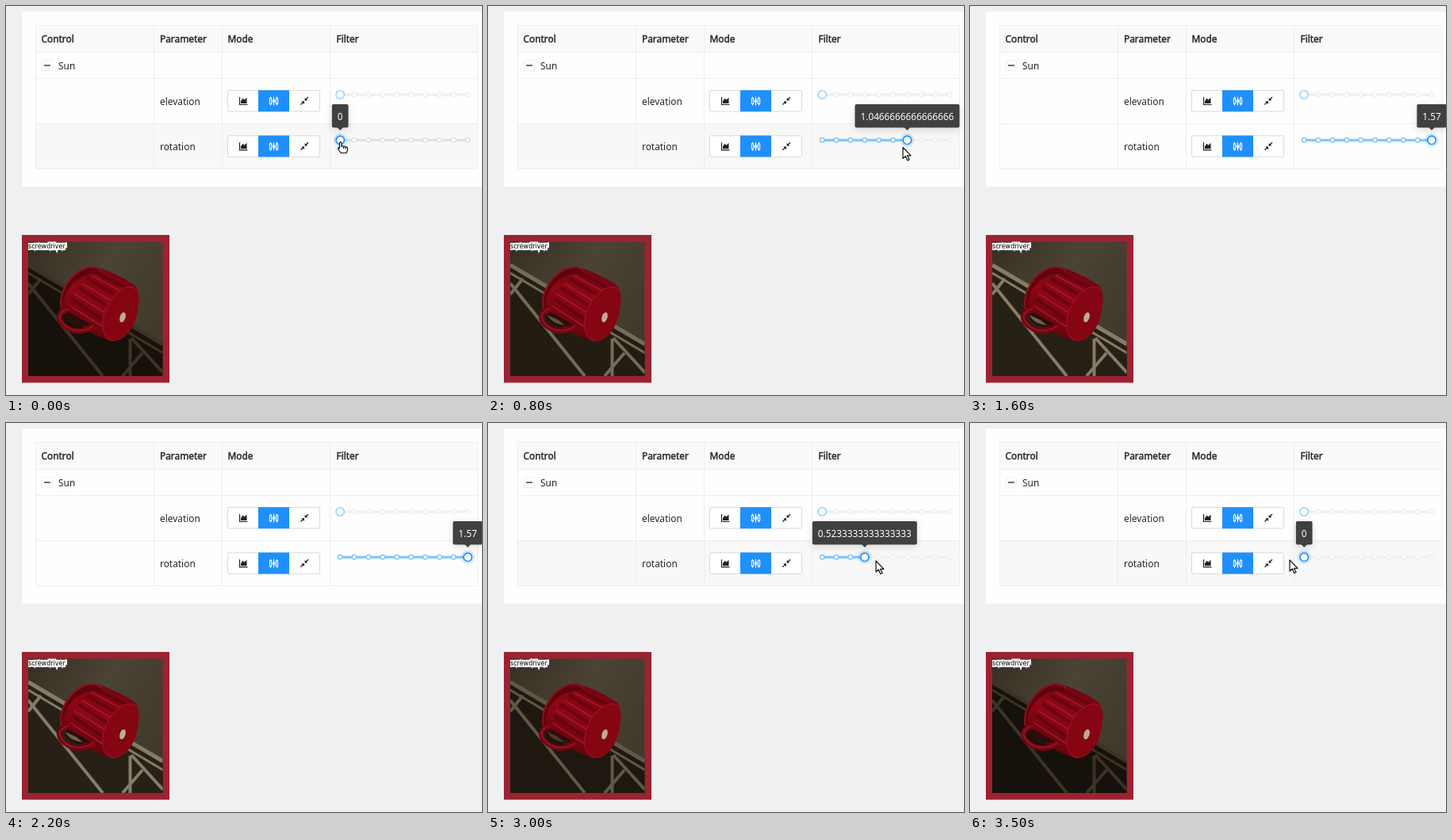
These frames come from a looping animation (600 by 491 pixels, 3600 ms). An HTML page:

```html
<!DOCTYPE html>
<html lang="en">
<head>
<meta charset="utf-8">
<title>Sun control</title>
<style>
  html, body { margin: 0; width: 600px; height: 491px; overflow: hidden; background: #eef0f2; }
  svg { display: block; font: 11.9px "Noto Sans", "Open Sans", sans-serif; fill: none; }
  text { fill: #262626; }
  .head { stroke: #262626; stroke-width: .45; }
  .cell { stroke: #eeeeee; }
  .tip { filter: drop-shadow(0 3px 5px #0002); }
  .label { font: 8px "DejaVu Sans", sans-serif; fill: #000; stroke: #fff; stroke-width: 4.5; stroke-linejoin: miter; paint-order: stroke; }
</style>
</head>
<body>
<svg width="600" height="491" viewBox="0 0 600 491">
  <defs>
    <clipPath id="photo"><path d="M28 297.500h169.500v169.500H28z"/></clipPath>
    <clipPath id="body"><use href="#mugShape"/></clipPath>
    <linearGradient id="floor" x1="0" y1="0" x2="1" y2=".6">
      <stop stop-color="#352e22"/><stop offset=".5" stop-color="#4b4435"/><stop offset="1" stop-color="#40392c"/>
    </linearGradient>
    <linearGradient id="red" x1=".75" y1=".1" x2=".3" y2=".95">
      <stop stop-color="#740510"/><stop offset=".45" stop-color="#8f0716"/><stop offset="1" stop-color="#5c030b"/>
    </linearGradient>
    <g id="buttons">
      <rect x="279.500" y="106.500" width="116" height="26.500" rx="1.500" fill="#fff" stroke="#d9d9d9"/>
      <path d="M318 106.200h39v27h-39z" fill="#1f90fb"/>
      <path d="M294.500 115v9.500h10" stroke="#222" stroke-width="1.200"/>
      <path d="M296 123v-3l2.500-3.500 2 2 3-3v7.500z" fill="#222"/>
      <g stroke="#fff" stroke-width="1.100">
        <path d="M333.500 114.500v2m0 7v2M337.500 114.500v11M341.500 114.500v2m0 7v2"/>
        <rect x="332.400" y="116.500" width="2.200" height="7"/><rect x="340.400" y="116.500" width="2.200" height="7"/>
        <path d="M337.500 117.500l1.500 2.500-1.500 2.500-1.500-2.500z" fill="#fff"/>
      </g>
      <path d="M381 115l-4 4M371.500 124.500l4-4" stroke="#222" stroke-width="1.300"/>
      <path d="M376.700 115.700v3.600h3.600zM372.300 120.300h3.600v3.600z" fill="#222"/>
    </g>
    <g id="truss">
      <path d="M28 327L198 427" stroke-width="5"/>
      <path d="M28 337L198 438" stroke-width="3"/>
      <path d="M28 350L122 467M44 344L28 364M156.500 420V467M172 438L147 467M158 419L198 463" stroke-width="4"/>
    </g>
  </defs>

  <path d="M20 7h580v221H20z" fill="#fefefe"/>
  <path d="M37 24h557v34H37z" fill="#fafafa"/>
  <path id="row" d="M37 149h557v56H37z" fill="#f8f8f8"/>
  <path class="cell" d="M37.500 24.500h557v181h-557zM37 58.500h557M37 91.500h557M37 148.500h557M186.500 24v181M272.500 24v181M408.500 24v181"/>
  <g class="head">
    <text x="44.500" y="46">Control</text><text x="194" y="46">Parameter</text>
    <text x="279.500" y="46">Mode</text><text x="416.500" y="46">Filter</text>
  </g>
  <rect x="45.500" y="68.500" width="13" height="13" rx="1" fill="#fff" stroke="#eee"/>
  <path d="M48 75h8" stroke="#222" stroke-width="1.300"/>
  <text x="66" y="79.500">Sun</text>
  <text x="194" y="125">elevation</text><text x="194" y="182">rotation</text>
  <use href="#buttons"/><use href="#buttons" y="57.300"/>
  <g id="sliders"></g>

  <path d="M20 289h186v186.500H20z" fill="#9b2331"/>
  <g clip-path="url(#photo)">
    <path d="M28 297h170v170H28z" fill="url(#floor)"/>
    <path d="M28 328L198 428V467H28z" fill="#17110b"/>
    <use href="#truss" stroke="#3b3326"/>
    <g id="lit">
      <path d="M28 328L198 428V467H28z" fill="#272016"/>
      <use href="#truss" stroke="#857b67"/>
    </g>
    <path id="mugShape" d="M108 328.500C128 332 150 344 163 353C169 361 168 374 165 389C161 407 149 424 132 423C111 416 86 402 70 385C62 369 79 331 108 328.500z" fill="url(#red)"/>
    <g clip-path="url(#body)">
      <path d="M113 336l49 25M102 344l43 25M91 355l40 26M83 369l40 28" stroke="#5a030c" stroke-opacity=".6" stroke-width="4.500"/>
      <path d="M108 340l46 25M96 350l41 25M86 363l40 25M80 378l42 27" stroke="#ae2030" stroke-opacity=".75" stroke-width="1.500"/>
      <path d="M70 383C62 366 82 331 119 333" stroke="#5c040d" stroke-width="9"/>
      <ellipse cx="146" cy="388.500" rx="36" ry="21" transform="rotate(-65 146 388.500)" fill="#860512" stroke="#9a1322" stroke-width="1.200"/>
    </g>
    <path d="M71 384C63 368 81 331 109 329.500Q116 330 121 335" stroke="#8f101d" stroke-width="2"/>
    <ellipse cx="147" cy="393" rx="3.500" ry="6.500" transform="rotate(18 147 393)" fill="#b8ad9a"/>
    <path d="M78 386C70 392 78 402 92 405L107 402z" fill="#2a0e0b"/>
    <path id="glint" d="M75 390Q80 401 97 403L88 396z" fill="#6f6350"/>
    <path d="M82 382C64 385 64 396 74 404C86 413 99 412 112 404" stroke="#760511" stroke-width="6.500"/>
    <path d="M79 382C63 387 66 396 75 404C86 412 99 411 110 404" stroke="#a01a28" stroke-width="1.300"/>
    <text class="label" x="28" y="306">screwdriver</text>
  </g>

  <g class="tip">
    <rect id="tipBox" y="124" height="29.500" rx="2" fill="#404040"/>
    <path id="tipArrow" d="M-4 153h8l-4 4z" fill="#404040"/>
    <text id="tipText" y="143.800" text-anchor="middle" style="fill:#fff;font-size:11.800px"></text>
  </g>
  <g id="cursor" fill="#fff" stroke="#111" stroke-width="1.200" stroke-linejoin="round">
    <path id="arrow" d="M0 0V14L3.300 11L5.700 16.500L8 15.500L5.600 10.300H10z"/>
    <path id="hand" d="M-.5 1.500Q.7 -.5 2 1.500V6.500Q3.500 5 4.500 6.500Q6 5.500 7 7Q9.500 6.500 9.500 9V11L8 14.500H1L-2.500 9Q-2.500 7 -.5 8.500zM4.500 7v2M7 7.500v2"/>
  </g>
</svg>
<script>
const LOOP = 3600, TICK = 100, STEPS = 9, MAX = 1.57;
// time, pointer x, pointer y, slider step
const PATH = [
  [0, 421, 171, 0], [500, 476, 171, 3], [1100, 570, 186, 8], [1400, 618, 190, 9],
  [2400, 604, 188, 9], [2600, 561, 183, 8], [3000, 489, 174, 3], [3500, 403, 173, 0], [3600, 403, 173, 0]
];
const $ = id => document.getElementById(id);
const set = (id, attrs) => { for (const k in attrs) $(id).setAttribute(k, attrs[k]); };
const clamp = n => Math.max(0, Math.min(1, n));
const stepX = i => 421.2 + i * 17.87;

function slider(y, step, rail, track, handle, focused) {
  const x = stepX(step);
  let out = `<g stroke-width="3.2"><path d="M421 ${y}H582" stroke="${rail}"/><path d="M421 ${y}H${x}" stroke="${track}"/></g>`;
  for (let i = 0; i <= STEPS; i++)
    out += `<circle cx="${stepX(i)}" cy="${y}" r="2.7" fill="#fff" stroke="${i <= step ? track : rail}" stroke-width="1.5"/>`;
  if (focused) out += `<circle cx="${x}" cy="${y}" r="8.8" fill="#1890ff" fill-opacity=".17"/>`;
  return out + `<circle cx="${x}" cy="${y}" r="5.2" fill="#fff" stroke="${handle}" stroke-width="1.6"/>`;
}

function pose(t) {
  const k = PATH.findIndex(p => p[0] > t), a = PATH[k - 1], b = PATH[k];
  const f = (t - a[0]) / (b[0] - a[0]);
  return a.map((n, i) => n + (b[i] - n) * f);
}

function draw(t) {
  const [, px, py, raw] = pose(t);
  const step = Math.round(raw), x = stepX(step), dragging = t <= 600;
  const value = step === STEPS ? MAX : step * MAX / STEPS;

  $("sliders").innerHTML =
    slider(112, 0, "#f0f0f0", "#91d5ff", "#91d5ff") +
    slider(169.3, step, dragging ? "#e1e1e1" : "#f0f0f0", dragging ? "#55b0fa" : "#82c8fb", "#1f90fb", true);

  $("tipText").textContent = value;
  const width = $("tipText").getComputedTextLength() + 14;
  set("tipText", { x });
  set("tipBox", { x: x - width / 2, width });
  set("tipArrow", { transform: `translate(${x})` });

  const light = Math.pow(step / STEPS, .6);
  set("lit", { opacity: light });
  set("glint", { opacity: light });
  set("row", { opacity: t < 2000 ? clamp((1600 - t) / 200) : clamp((t - 2400) / 300) });
  set("cursor", { transform: `translate(${px} ${py})` });
  set("hand", { visibility: dragging ? "visible" : "hidden" });
  set("arrow", { visibility: dragging ? "hidden" : "visible" });
}

const start = performance.now();
function frame() {
  const t = (performance.now() - start) % LOOP;
  draw(Math.floor(t / TICK) * TICK);
  requestAnimationFrame(frame);
}
frame();
</script>
</body>
</html>
```
